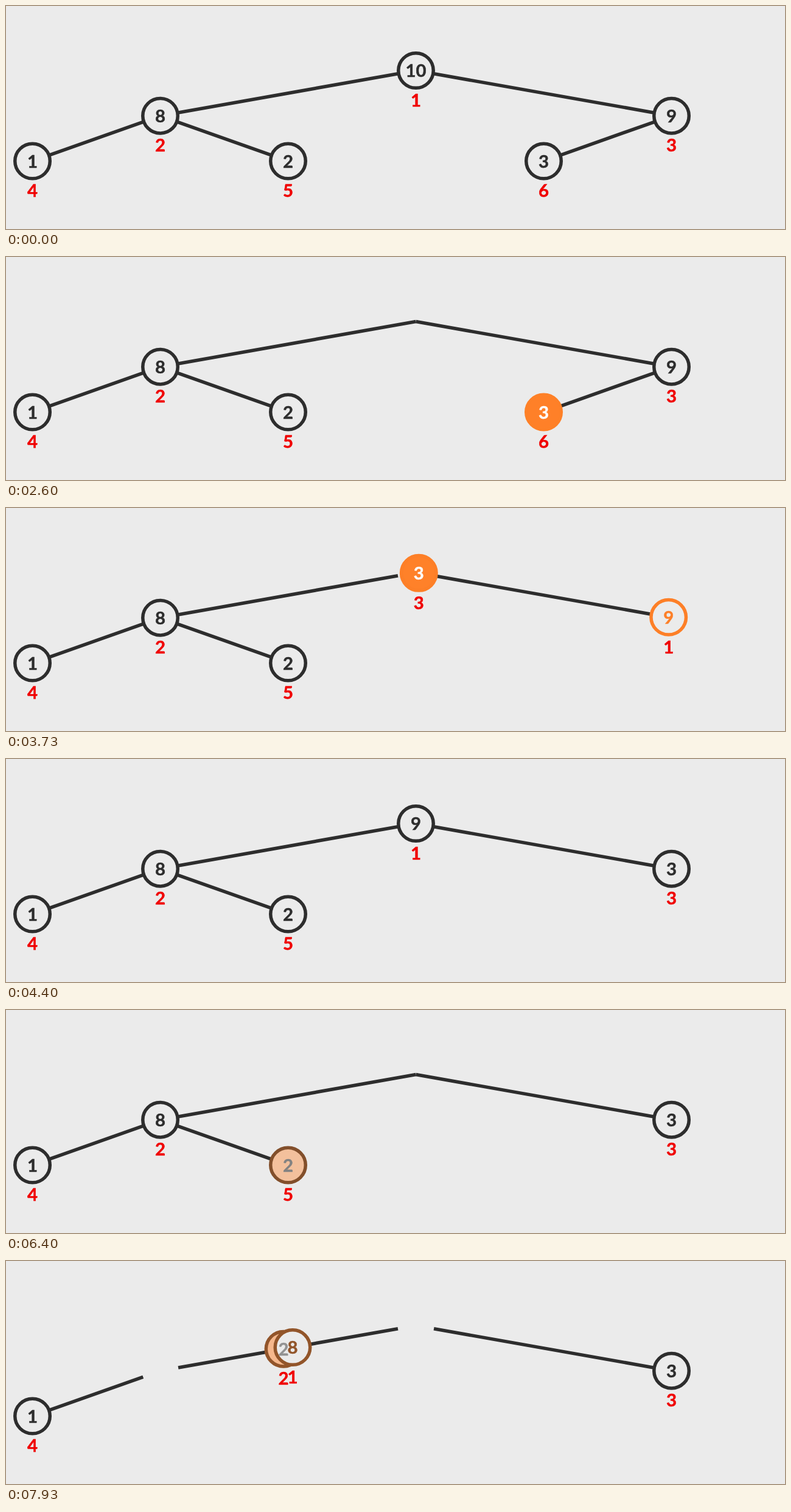
These frames come from a looping animation (1280x368 px, 8 s). An HTML page:

```html
<!DOCTYPE html>
<html lang="en">
<head>
<meta charset="utf-8">
<title>Heap: extract max</title>
<style>
  html, body { margin: 0; width: 100%; height: 100%; overflow: hidden; background: #ebebeb; }
  svg { display: block; width: 1280px; height: 368px; }
  line { stroke: #2d2d2d; stroke-width: 5.6; }
  text { font-family: Lato, "Open Sans", sans-serif; font-weight: 700; text-anchor: middle; stroke-width: .5; }
  .label { fill: #f00000; stroke: #f00000; }
</style>
</head>
<body>
<svg id="stage" viewBox="0 0 1280 368"></svg>
<script>
const LOOP = 8000, STEP = 500, FONT = 29.3, TRIM = 30;
const DARK = [45, 45, 45], HOT = [255, 128, 39], PAPER = [235, 235, 235], WHITE = [255, 255, 255];

// Heap slots, counted from 1
const slots = [null, [673.5, 106.5], [253.5, 181.2], [1093.5, 181.2],
  [43.5, 256], [463.5, 256], [883.5, 256]];
const values = [10, 8, 9, 1, 2, 3];
const edges = [[1, 2], [1, 3], [2, 4], [2, 5], [3, 6]];

// One extraction: root leaves, last leaf takes its place, then swaps with a child
const runs = [
  { start: 1140, root: 10, leaf: 3, from: 6, child: 9, slot: 3 },
  { start: 5158, root: 9, leaf: 2, from: 5, child: 8, slot: 2 }
];
const begins = { light: 0, shrink: 520, pick: 1010, move: 1506, compare: 2012, swap: 2520 };

const stage = document.getElementById("stage");
function add(tag, cls) {
  const el = document.createElementNS("http://www.w3.org/2000/svg", tag);
  if (cls) el.setAttribute("class", cls);
  return stage.appendChild(el);
}
function set(el, attrs) {
  for (const k in attrs) el.setAttribute(k, attrs[k]);
}
const mix = (a, b, p) => a.map((v, i) => v + (b[i] - v) * p);
const rgb = c => `rgb(${c.map(Math.round)})`;
function ease(t) {
  t = Math.min(1, Math.max(0, t));
  return t < .5 ? 4 * t ** 3 : 1 - 4 * (1 - t) ** 3;
}

const lines = edges.map(() => add("line"));
// Later items lie on top: moving leaves go below the nodes they pass
const order = [10, 1, 3, 2, 9, 8];
const circles = {}, names = {}, labels = {};
for (const v of order) circles[v] = add("circle");
for (const v of order) {
  names[v] = add("text");
  names[v].textContent = v;
}
for (const v of order) labels[v] = add("text", "label");

function stateAt(t) {
  const nodes = {}, left = {};
  values.forEach((v, i) => {
    nodes[v] = { pos: slots[i + 1], label: i + 1, size: 1, ring: 0, fill: 0 };
  });
  let gap = TRIM;
  for (const run of runs) {
    if (t < run.start) break;
    const p = {};
    for (const k in begins) p[k] = ease((t - run.start - begins[k]) / STEP);
    const began = k => t >= run.start + begins[k];
    const root = nodes[run.root], leaf = nodes[run.leaf], child = nodes[run.child];

    root.ring = root.fill = p.light;
    root.size = 1 - p.shrink;

    leaf.ring = leaf.fill = p.pick * (1 - p.swap);
    leaf.pos = mix(mix(slots[run.from], slots[1], p.move), slots[run.slot], p.swap);
    leaf.label = began("swap") ? run.slot : began("move") ? 1 : run.from;

    child.ring = p.compare * (1 - p.swap);
    child.pos = mix(slots[run.slot], slots[1], p.swap);
    if (began("swap")) child.label = 1;

    gap *= 1 - p.shrink + p.move;
    left[run.from] = 1 - p.move;
  }
  return { nodes, left, gap };
}

function drawEdge(el, [a, b], left, gap) {
  const A = slots[a], B = slots[b];
  const len = Math.hypot(B[0] - A[0], B[1] - A[1]);
  const s = mix(A, B, (a === 1 ? gap : TRIM) / len);
  const e = mix(s, mix(B, A, TRIM / len), left);
  set(el, { x1: s[0], y1: s[1], x2: e[0], y2: e[1], visibility: left > 0 ? "visible" : "hidden" });
}

function drawNode(v, n) {
  const [x, y] = n.pos;
  const visibility = n.size > .001 ? "visible" : "hidden";
  const ink = rgb(mix(DARK, n.fill > 0 ? WHITE : HOT, n.fill || n.ring));
  const size = FONT * n.size;
  set(circles[v], {
    cx: x, cy: y, r: 28.75 * n.size, "stroke-width": 5.5 * n.size, visibility,
    stroke: rgb(mix(DARK, HOT, n.ring)), fill: rgb(mix(PAPER, HOT, n.fill))
  });
  set(names[v], { x, y: y + 10.6, "font-size": size, fill: ink, stroke: ink, visibility });
  set(labels[v], { x, y: y + 59.2, "font-size": size, visibility });
  if (labels[v].textContent !== String(n.label)) labels[v].textContent = n.label;
}

function draw(t) {
  const { nodes, left, gap } = stateAt(t);
  edges.forEach((e, i) => drawEdge(lines[i], e, left[e[1]] ?? 1, gap));
  for (const v of order) drawNode(v, nodes[v]);
}

const t0 = performance.now();
function tick() {
  draw((performance.now() - t0) % LOOP);
  requestAnimationFrame(tick);
}
draw(0);
requestAnimationFrame(tick);
</script>
</body>
</html>
```
